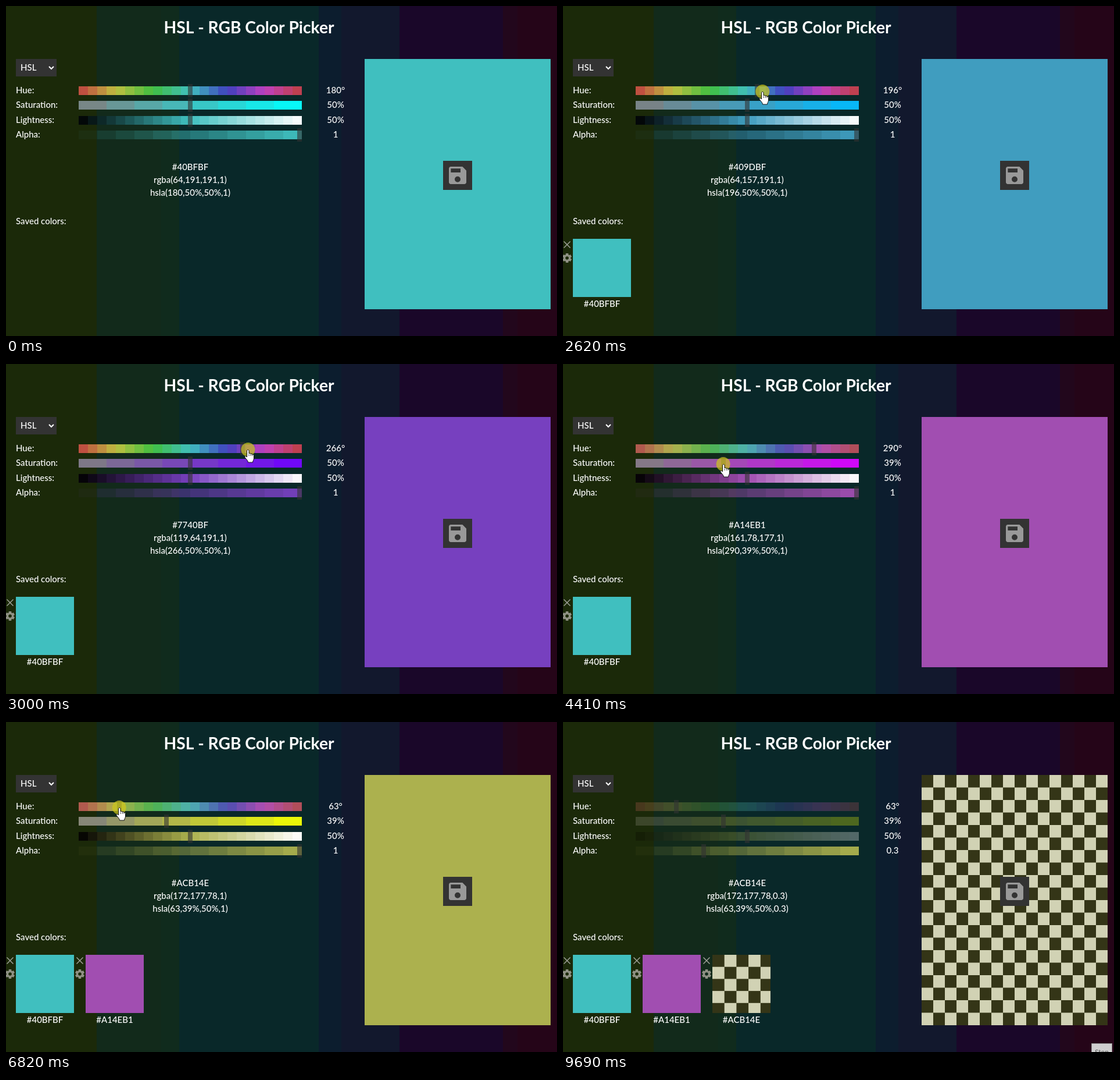
These frames come from a looping animation (948x567 px, 9.76 s). An HTML page with a canvas:

```html
<!DOCTYPE html>
<html lang="en">
<head>
<meta charset="utf-8">
<title>HSL - RGB Color Picker</title>
<style>
html, body { margin: 0; width: 100%; height: 100%; overflow: hidden; background: #092829; }
canvas { display: block; }
</style>
</head>
<body>
<canvas id="stage" width="948" height="567"></canvas>
<script>
const ctx = document.getElementById('stage').getContext('2d');
const LOOP = 9760;
const REFRESH = 76.7;
const POINTER_LEAD = 50; // the sliders follow the pointer a little late
const FONT = 'Lato, "Open Sans", sans-serif';
const BAR = { x: 125, w: 384, h: 15, thumb: 8 };

const hsla = (h, s, l, a) => `hsla(${h},${s}%,${l}%,${a})`;
const mix = (a, b, p) => a + (b - a) * p;
const progress = (t, start, end) => Math.max(0, Math.min(1, (t - start) / (end - start)));
const ease = p => p * p * (3 - 2 * p);

const SLIDERS = {
  h: { label: 'Hue:', y: 138, max: 360, unit: '°', digits: 0, bands: 24, color: (p, c) => hsla(p * 360, c.s, c.l, c.a) },
  s: { label: 'Saturation:', y: 163, max: 100, unit: '%', digits: 0, bands: 8, color: (p, c) => hsla(c.h, p * 100, c.l, c.a) },
  l: { label: 'Lightness:', y: 189, max: 100, unit: '%', digits: 0, bands: 24, color: (p, c) => hsla(c.h, c.s, p * 100, c.a) },
  a: { label: 'Alpha:', y: 214, max: 1, unit: '', digits: 2, bands: 12, color: (p, c) => hsla(c.h, c.s, c.l, p) }
};

const BACKDROP = {
  0: '#1b2909', 156: '#122a1b', 267: '#102b1d', 298: '#092829', 538: '#0c1d2e',
  577: '#12182d', 677: '#1a0729', 855: '#22071c', 880: '#250518'
};

const SAVE_ICON = new Path2D('M17 3H5c-1.1 0-2 .9-2 2v14c0 1.1.9 2 2 2h14c1.1 0 2-.9 2-2V7zM12 19a3 3 0 1 1 0-6a3 3 0 1 1 0 6zM15 9H5V5h10z');
const ARROW = new Path2D('M.5 .5V16.5L4.2 13L6.6 18.5L9 17.5L6.7 12H11.5Z');
const HAND = new Path2D('M-1.5 2C-1.5 0 2 0 2 2V7C3 6 5 6.3 5.2 7.6C6.5 6.8 8 7.4 8 8.6C9.5 8 10.5 9 10.5 10.3V15C10.5 18 8.5 19 8.5 22H.5C.5 19-2.5 17-4.8 13.5C-6 11-3.5 10.4-1.5 13Z');

const thumbX = (key, value) => BAR.x + value / SLIDERS[key].max * (BAR.w - BAR.thumb);
const gripX = (key, value) => thumbX(key, value) + BAR.thumb / 2;

// Each action changes the state according to how far it has got at time t.
const move = (start, end, x, y) => (state, t) => {
  const p = ease(progress(t, start, end));
  state.x = mix(state.x, x, p);
  state.y = mix(state.y, y, p);
};

const reach = (start, end, key) => (state, t) =>
  move(start, end, gripX(key, state[key]), SLIDERS[key].y + 9)(state, t);

const drag = (start, end, key, value) => (state, t) => {
  if (t < start) return;
  const from = state[key];
  state[key] = +mix(from, value, progress(t, start, end)).toFixed(SLIDERS[key].digits);
  state.x = gripX(key, mix(from, value, progress(t + POINTER_LEAD, start, end)));
  state.pressed ||= t < end + REFRESH;
};

const save = (start, end) => (state, t) => {
  if (t < start) return;
  state.saved.push([state.h, state.s, state.l, state.a]);
  state.pressed ||= t < end;
};

const ACTIONS = [
  move(280, 610, 717, 204),
  move(770, 1300, 780, 280),
  save(1450, 1680),
  move(1610, 2130, 220, 310),
  reach(2130, 2450, 'h'),
  drag(2520, 3122, 'h', 290),
  reach(3220, 3620, 's'),
  drag(3840, 4310, 's', 39),
  move(4490, 5190, 780, 280),
  save(5300, 5570),
  move(5500, 5920, 246, 287),
  reach(5920, 6180, 'h'),
  drag(6360, 6740, 'h', 63),
  reach(6980, 7220, 'a'),
  drag(7280, 7660, 'a', 0.3),
  move(7820, 7980, 789, 270),
  move(8220, 8520, 774, 288),
  save(8580, 8970),
  move(8890, 9200, 960, 485)
];

function stateAt(t) {
  const state = { x: 868, y: 474, h: 180, s: 50, l: 50, a: 1, pressed: false, saved: [] };
  ACTIONS.forEach(action => action(state, t));
  return state;
}

function toRgb(h, s, l) {
  const amp = s / 100 * Math.min(l, 100 - l) / 100;
  return [0, 8, 4].map(n => {
    const k = (n + h / 30) % 12;
    return Math.round(255 * (l / 100 - amp * Math.max(-1, Math.min(k - 3, 9 - k, 1))));
  });
}

const toHex = rgb => '#' + rgb.map(v => v.toString(16).padStart(2, '0')).join('').toUpperCase();

function rect(x, y, w, h, color) {
  ctx.fillStyle = color;
  ctx.fillRect(x, y, w, h);
}

function text(string, x, y, align = 'left', font = '500 15px', color = '#fff') {
  ctx.font = `${font} ${FONT}`;
  ctx.textAlign = align;
  ctx.fillStyle = color;
  ctx.fillText(string, x, y);
}

function line(points, color, width) {
  ctx.beginPath();
  points.forEach(([x, y]) => ctx.lineTo(x, y));
  ctx.strokeStyle = color;
  ctx.lineWidth = width;
  ctx.stroke();
}

function placed(x, y, scale, drawShape) {
  ctx.save();
  ctx.translate(x, y);
  ctx.scale(scale, scale);
  drawShape();
  ctx.restore();
}

function colorBox(x, y, w, h, cellW, cellH, color) {
  rect(x, y, w, h, '#000');
  for (let row = 0; row * cellH < h; row++) {
    for (let col = 1 - row % 2; col * cellW < w; col += 2) {
      const dx = col * cellW, dy = row * cellH;
      rect(x + dx, y + dy, Math.min(cellW, w - dx), Math.min(cellH, h - dy), '#e0e0e0');
    }
  }
  rect(x, y, w, h, hsla(...color));
}

function slider(key, state) {
  const { label, y, unit, bands, color } = SLIDERS[key];
  text(label, 17, y + 12);
  text(state[key] + unit, 567, y + 12, 'center');
  const w = BAR.w / bands;
  for (let i = 0; i < bands; i++) rect(BAR.x + i * w, y, w, BAR.h, color((i + 0.5) / bands, state));
  rect(Math.round(thumbX(key, state[key])), y - 4, BAR.thumb, BAR.h + 8, 'rgba(51,51,51,.6)');
}

function gear(x, y) {
  const color = '#8f9184';
  ctx.strokeStyle = color;
  ctx.lineWidth = 3.4;
  ctx.beginPath();
  ctx.arc(x, y, 4.5, 0, 7);
  ctx.stroke();
  for (let i = 0; i < 6; i++) {
    const angle = Math.PI * (i / 3 + 1 / 6);
    line([5, 8].map(r => [x + r * Math.cos(angle), y + r * Math.sin(angle)]), color, 4.5);
  }
}

function savedColor(color, index) {
  const x = 17 + index * 120;
  line([[x - 15.5, 404.5], [x - 4.5, 415.5]], '#a0a29a', 1.5);
  line([[x - 4.5, 404.5], [x - 15.5, 415.5]], '#a0a29a', 1.5);
  gear(x - 10, 433);
  colorBox(x, 400, 100, 100, 20.7, 20.7, color);
  text(toHex(toRgb(...color)), x + 50, 517, 'center');
}

function pointer({ x, y, pressed }) {
  if (pressed) {
    ctx.beginPath();
    ctx.arc(x, y, 12, 0, 7);
    ctx.fillStyle = 'rgba(205,200,25,.7)';
    ctx.fill();
  }
  const onSlider = x > 121 && x < 513 && y > 130 && y < 235;
  placed(Math.round(x), Math.round(y), 1, () => {
    const shape = onSlider ? HAND : ARROW;
    ctx.fillStyle = '#fff';
    ctx.strokeStyle = '#111';
    ctx.lineWidth = 1;
    ctx.fill(shape);
    ctx.stroke(shape);
    if (onSlider) for (const x of [2, 5.2, 8]) line([[x, 8], [x, 11]], '#111', 0.8);
  });
}

function draw(time) {
  const t = Math.floor(time / REFRESH) * REFRESH;
  const state = stateAt(t);
  const { h, s, l, a } = state;
  const rgb = toRgb(h, s, l);

  for (const x in BACKDROP) rect(+x, 0, 948 - x, 567, BACKDROP[x]);
  text('HSL - RGB Color Picker', 418, 47, 'center', 'bold 28.2px');

  rect(17, 91, 70, 30, '#333');
  text('HSL', 25, 111);
  line([[74, 104], [78, 108], [82, 104]], '#fff', 2);

  for (const key in SLIDERS) slider(key, state);

  text(toHex(rgb), 317, 282, 'center');
  text(`rgba(${rgb},${a})`, 317, 304, 'center');
  text(hsla(h, s, l, a), 317, 326, 'center');

  text('Saved colors:', 17, 375);
  state.saved.forEach(savedColor);

  colorBox(617, 91, 320, 430, 20, 21.5, [h, s, l, a]);
  rect(752, 266, 50, 50, '#333');
  placed(757, 271, 5 / 3, () => {
    ctx.fillStyle = '#999';
    ctx.fill(SAVE_ICON, 'evenodd');
  });

  if (t > 200) pointer(state);
  if (t > 9580) {
    rect(909, 552, 36, 15, '#8c8c8c');
    rect(910, 553, 34, 14, '#cfcfcf');
    text('Stop', 915, 571, 'left', '12px', '#555');
  }
}

const start = performance.now();
function tick() {
  draw((performance.now() - start) % LOOP);
  requestAnimationFrame(tick);
}
tick();
</script>
</body>
</html>
```
